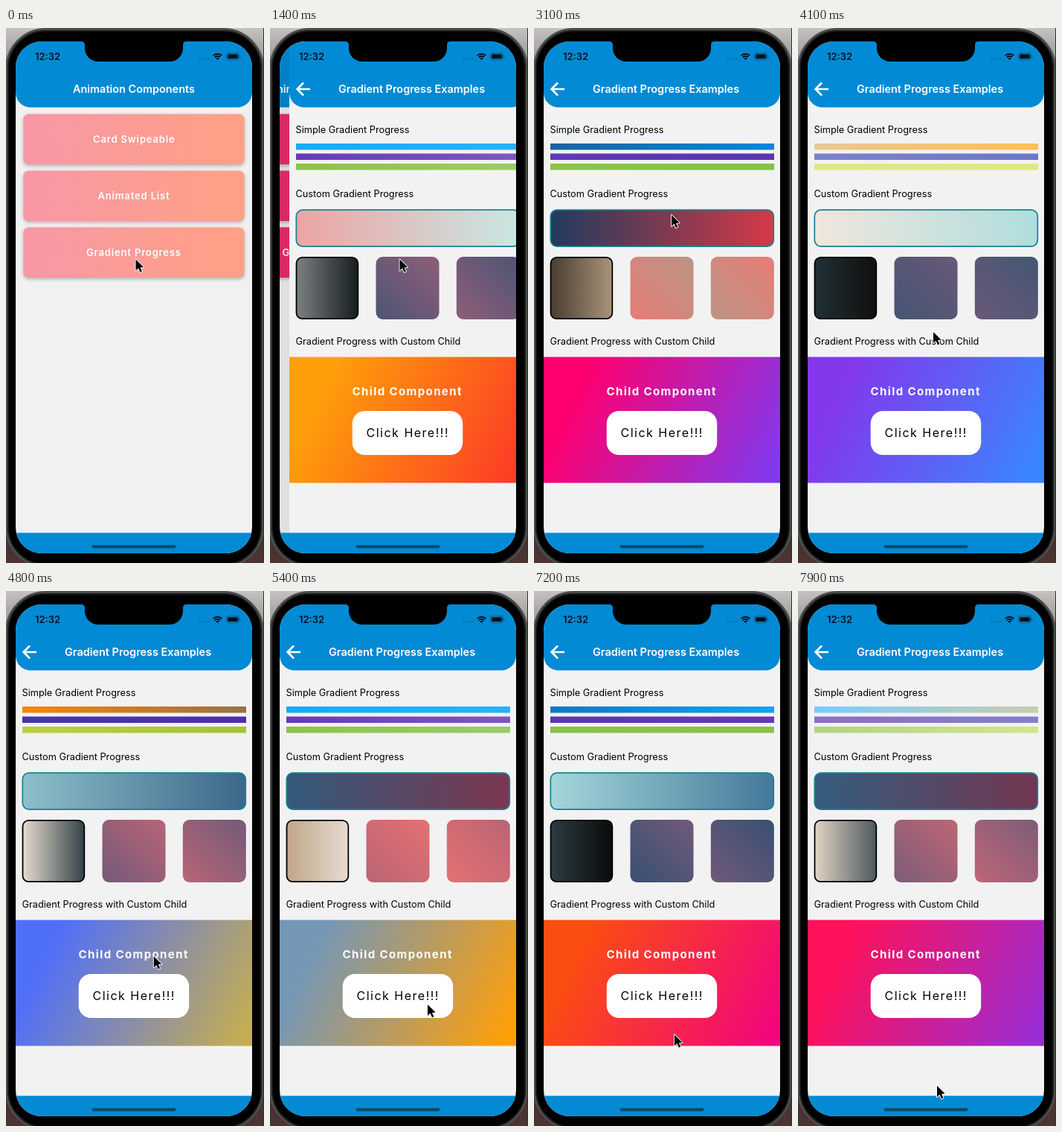
These frames come from a looping animation (347x718 px, 8000 ms). An HTML page with a canvas:

```html
<!DOCTYPE html>
<html lang="en">
<head>
<meta charset="utf-8">
<title>Gradient Progress</title>
<style>
  html, body { margin: 0; width: 100%; height: 100%; overflow: hidden; background: #000; }
  canvas { display: block; width: 347px; height: 718px; }
</style>
</head>
<body>
<canvas id="stage"></canvas>
<script>
const W = 347, H = 718, LOOP = 8000;
const SX = 13, SY = 18, SW = 318, SH = 687;
const BLUE = '#028ad4';
const FONT = 'Inter, "Noto Sans", sans-serif';

const canvas = document.getElementById('stage');
const g = canvas.getContext('2d');
const dpr = window.devicePixelRatio || 1;
canvas.width = W * dpr;
canvas.height = H * dpr;

const palette = s => s.split(' ').map(h => [0, 2, 4].map(i => parseInt(h.substr(i, 2), 16)));
const mix = (a, b, k) => a.map((v, i) => v + (b[i] - v) * k);
const css = c => `rgb(${c.map(Math.round).join(',')})`;
const clamp = v => Math.max(0, Math.min(1, v));
const ease = k => k * k * (3 - 2 * k);
const mod = (a, n) => ((a % n) + n) % n;

const MENU = palette('f48fb1 ffab91 ff8a65 e91e63 ec407a');
const WIDE = palette('e63946 f1faee a8dadc 457b9d 1d3557');
const EARTH = palette('0a0908 5e503f c6ac8f eae0d5 22333b');
const DUSK = palette('355070 6d597a b56576 e56b6f eaac8b');
const CHILD = palette('ffbe0b fb5607 ff006e 8338ec 3a86ff');

// The thin bars share one 2 s cycle with uneven stops.
const BAR_CYCLE = 2000, BAR_GAP = 170;
const BAR_AT = [0, 170, 300, 470, 800, 970, 1000, 1170, 1400, 1570, 1780];
const BARS = [
  '1d62a0 0288d8 1aa9f5 28b2f9 78ccfb c8ccb0 e8c994 ffbf55 ffa832 ff9a10 ef7c08',
  '6038b8 5a33b0 673ab7 7e57c2 8e6ccb 8280cb 7a83ca 6b78c6 4c5bba 3f51b5 4527a0',
  '8bc34a 86c143 8bc34a 9ccc65 aed581 d4e58a dce888 dde980 dce775 d4e157 afc42b'
].map(palette);

// Colour at a fractional position of a cyclic palette
function cyc(pal, p) {
  const n = pal.length, q = mod(p, n), i = Math.floor(q);
  return mix(pal[i], pal[(i + 1) % n], q - i);
}

function barColor(pal, t) {
  const q = mod(t, BAR_CYCLE);
  let i = BAR_AT.length - 1;
  while (BAR_AT[i] > q) i--;
  const end = BAR_AT[i + 1] || BAR_CYCLE;
  return mix(pal[i], pal[(i + 1) % pal.length], (q - BAR_AT[i]) / (end - BAR_AT[i]));
}

function grad(x0, y0, x1, y1, a, b) {
  const lg = g.createLinearGradient(x0, y0, x1, y1);
  lg.addColorStop(0, css(a));
  lg.addColorStop(1, css(b));
  return lg;
}

function box(x, y, w, h, r, fill, line, width) {
  g.beginPath();
  g.roundRect(x, y, w, h, r);
  if (fill) { g.fillStyle = fill; g.fill(); }
  if (line) { g.strokeStyle = line; g.lineWidth = width; g.stroke(); }
}

function text(s, x, y, size, weight, color, space = 0) {
  g.font = `${weight} ${size}px ${FONT}`;
  g.letterSpacing = space + 'px';
  g.fillStyle = color;
  g.fillText(s, x, y);
}

function line(points, color, width) {
  g.beginPath();
  points.forEach(p => g.lineTo(...p));
  g.strokeStyle = color;
  g.lineWidth = width;
  g.stroke();
}

function header(title, x) {
  box(SX, SY, SW, 88.5, [0, 0, 20, 20], BLUE);
  text(title, x, 87, 14.45, 600, '#fff');
}

function drawMenu(t) {
  g.fillStyle = '#f1f1f1';
  g.fillRect(SX, SY, SW, SH);
  header('Animation Components', 90);
  const p = 0.3 + t / 500;
  const fill = grad(23.5, 0, 320.5, 0, cyc(MENU, p), cyc(MENU, p + 1));
  [['Card Swipeable', 117], ['Animated List', 123.5], ['Gradient Progress', 108]].forEach(([s, x], i) => {
    const y = 115.5 + i * 76;
    g.save();
    g.shadowColor = 'rgba(0,0,0,.28)';
    g.shadowBlur = 5 * dpr;
    g.shadowOffsetY = 2 * dpr;
    box(23.5, y, 297, 67.5, 7, fill);
    g.restore();
    text(s, x, y + 38.7, 13, 600, '#fff', 0.85);
  });
}

function drawExamples(t) {
  g.fillStyle = '#f2f2f2';
  g.fillRect(SX, SY, SW, SH);
  header('Gradient Progress Examples', 79);
  g.lineCap = 'butt';
  g.lineJoin = 'miter';
  line([[23.5, 82], [41, 82]], '#fff', 2.5);
  line([[32, 73.5], [23.5, 82], [32, 90.5]], '#fff', 2.5);

  text('Simple Gradient Progress', 21.5, 140.7, 12.74, 400, '#000');
  text('Custom Gradient Progress', 21.5, 227.2, 12.74, 400, '#000');
  text('Gradient Progress with Custom Child', 21.5, 425.2, 12.74, 400, '#000');

  const since = t - 1100;
  BARS.forEach((pal, i) => {
    g.fillStyle = grad(22, 0, 323, 0, barColor(pal, since), barColor(pal, since + BAR_GAP));
    g.fillRect(22, 155 + i * 13.5, 301, 8.5);
  });

  const s = (t - 1400) / 1000;
  const wide = 0.55 + 1.98 * s;
  box(22.3, 244.1, 300, 49, 8.5,
    grad(22, 0, 323, 0, cyc(WIDE, wide), cyc(WIDE, wide + 1)), '#168291', 1.7);

  const earth = 3.55 - 1.655 * s;
  box(22.5, 307.8, 82.8, 82.4, 8,
    grad(22, 0, 106, 0, cyc(EARTH, earth), cyc(EARTH, earth + 1)), '#000', 1.8);

  const dusk = 0.45 + 1.655 * s;
  const a = cyc(DUSK, dusk), b = cyc(DUSK, dusk + 1);
  box(129.5, 307, 85, 84, 9, grad(129.5, 391, 214.5, 307, a, b));
  box(237.8, 307, 85, 84, 9, grad(237.8, 391, 322.8, 307, b, a));

  const child = since / 1000;
  const at = (u, v) => [SX + SW * u, 441.5 + 169 * v];
  g.fillStyle = grad(...at(0.15, 0.2), ...at(0.95, 0.95), cyc(CHILD, child), cyc(CHILD, child + 1));
  g.fillRect(SX, 441.5, SW, 169);
  text('Child Component', 97.5, 493.3, 15, 700, '#fff', 1.4);

  // Button fades while it is pressed
  const press = ease(clamp((t - 6250) / 150)) - ease(clamp((t - 6600) / 250));
  g.save();
  g.globalAlpha = 1 - 0.8 * press;
  box(97.7, 514, 148.5, 59, 16.5, '#fff');
  text('Click Here!!!', 116.5, 549.3, 16, 400, '#000', 1.5);
  g.restore();
}

function drawBody() {
  const bg = g.createLinearGradient(0, 0, 0, H);
  bg.addColorStop(0, '#c4c1c0');
  bg.addColorStop(0.08, '#8d8a8a');
  bg.addColorStop(0.9, '#3c3036');
  bg.addColorStop(1, '#4d3430');
  g.fillStyle = bg;
  g.fillRect(0, 0, W, H);
  box(0.5, 1.5, 345, 721, 53, '#000', '#4d4d4d', 3);
  box(3, 4, 340, 716, 50, '#000', '#222', 1.5);
  g.fillStyle = '#16401a';
  g.fillRect(346, 0, 1, H);
}

function drawNotch() {
  g.beginPath();
  g.moveTo(101, 17);
  g.lineTo(101, 18);
  g.quadraticCurveTo(106, 18, 106, 23);
  g.arcTo(106, 45, 124, 45, 18);
  g.arcTo(238, 45, 238, 27, 18);
  g.lineTo(238, 23);
  g.quadraticCurveTo(238, 18, 243, 18);
  g.lineTo(243, 17);
  g.fillStyle = '#000';
  g.fill();
}

function drawStatus() {
  const ink = '#04121c';
  text('12:32', 39, 42.8, 13, 600, ink);
  for (let i = 0; i < 4; i++) box(259 + i * 4, 40, 2.4, 2.4, 1.2, '#0870ad');
  g.lineCap = 'butt';
  g.strokeStyle = ink;
  g.lineWidth = 2;
  for (const r of [8.3, 5.2]) {
    g.beginPath();
    g.arc(284.5, 43, r, -Math.PI * 0.75, -Math.PI * 0.25);
    g.stroke();
  }
  g.beginPath();
  g.moveTo(284.5, 43);
  g.arc(284.5, 43, 3, -Math.PI * 0.75, -Math.PI * 0.25);
  g.fillStyle = ink;
  g.fill();
  box(296.5, 33.8, 17, 8.6, 2.6, null, '#0a4a72', 0.9);
  box(298, 35.2, 14, 5.8, 1.5, ink);
  box(314.4, 36.6, 1.2, 3, 0.6, '#0a4a72');
}

const PATH = [
  [0, 174.5, 310.5], [2000, 174.5, 310.5], [3100, 185, 251], [4100, 182, 408],
  [5400, 212, 555], [6100, 190, 554], [6700, 190, 554], [7900, 187, 664], [8000, 187, 664]
];

function drawCursor(t) {
  const i = PATH.findIndex(k => k[0] > t) - 1;
  const [a, b] = [PATH[i], PATH[i + 1]];
  const k = ease((t - a[0]) / (b[0] - a[0]));
  g.save();
  g.translate(a[1] + (b[1] - a[1]) * k, a[2] + (b[2] - a[2]) * k);
  g.beginPath();
  [[0, 0], [0, 15], [3.5, 11.8], [6, 17.3], [8.4, 16.2], [6, 10.9], [10.6, 10.6]]
    .forEach(p => g.lineTo(...p));
  g.closePath();
  g.lineJoin = 'round';
  g.strokeStyle = '#fff';
  g.lineWidth = 1.8;
  g.stroke();
  g.fillStyle = '#000';
  g.fill();
  g.restore();
}

function draw(t) {
  g.setTransform(dpr, 0, 0, dpr, 0, 0);
  drawBody();
  g.save();
  g.beginPath();
  g.roundRect(SX, SY, SW, SH, 35);
  g.clip();

  // Critically damped push from right to left
  const u = 0.01826 * Math.max(0, t - 1128);
  const left = (1 + u) * Math.exp(-u);
  const shift = SW * left;
  if (shift > 0.3) {
    g.save();
    g.translate(-0.3 * (SW - shift), 0);
    drawMenu(t);
    g.restore();
    g.fillStyle = `rgba(0,0,0,${0.075 * (1 - left)})`;
    g.fillRect(SX, SY, SW, SH);
  }
  if (u > 0) {
    g.save();
    g.translate(shift > 0.3 ? shift : 0, 0);
    drawExamples(t);
    g.restore();
  }

  g.fillStyle = BLUE;
  g.fillRect(SX, 677.5, SW, 28);
  box(115.5, 694, 113, 4.2, 2.1, '#0a4a70');
  drawStatus();
  g.restore();
  drawNotch();
  drawCursor(t);
}

function frame() {
  draw(performance.now() % LOOP);
  requestAnimationFrame(frame);
}
frame();
</script>
</body>
</html>
```
